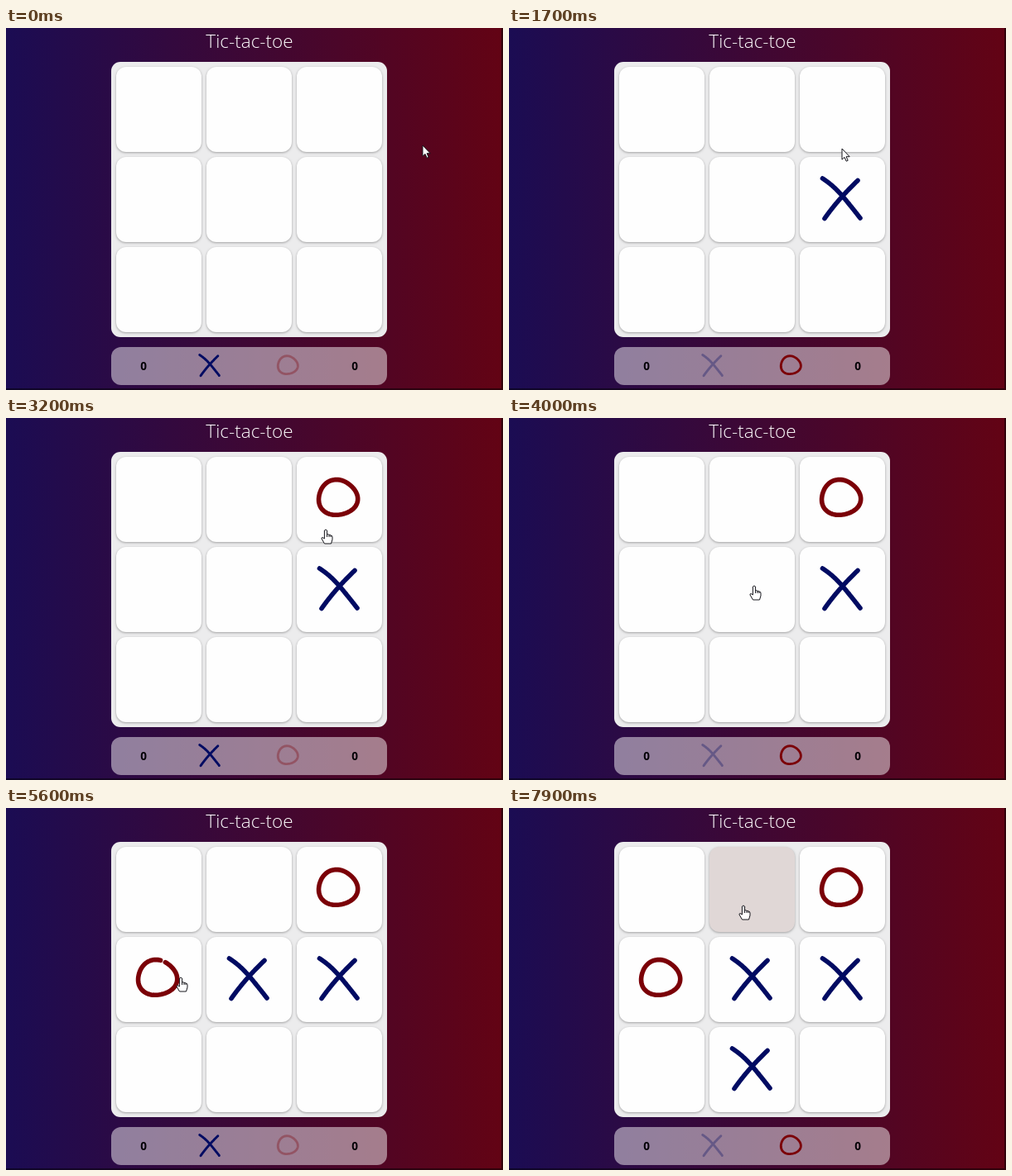
Animation, 600 px wide and 438 px high, one loop 8000 ms. Source, as an HTML page with a canvas:

```html
<!DOCTYPE html>
<html lang="en">
<head>
<meta charset="utf-8">
<title>Tic-tac-toe</title>
<style>
  html, body { margin: 0; width: 100%; height: 100%; overflow: hidden; background: #2b0840; }
  canvas { display: block; }
</style>
</head>
<body>
<canvas id="stage" width="600" height="438"></canvas>
<script>
const ctx = document.getElementById("stage").getContext("2d");
const LOOP = 8000, STEP = 100, DRAW_TIME = 600;
const CELL = { x: 133, y: 47, size: 103, pitch: 109 };
const INK = { X: "#000b62", O: "#7b0007" };
const HOVER = { X: "#d8d9e2", O: "#e0d7d6" };

const MOVES = [
  { at: 700, mark: "X", col: 2, row: 1 },
  { at: 2500, mark: "O", col: 2, row: 0 },
  { at: 4000, mark: "X", col: 1, row: 1 },
  { at: 5100, mark: "O", col: 0, row: 1 },
  { at: 7000, mark: "X", col: 1, row: 2 }
];

// Places where the pointer pauses.
const STOPS = [
  { x: 503, y: 142, arrive: 0, leave: 100 },
  { x: 405, y: 199, arrive: 700, leave: 1400 },
  { x: 402, y: 146, arrive: 1700, leave: 1700 },
  { x: 386, y: 135, arrive: 2300, leave: 3200 },
  { x: 296, y: 203, arrive: 3900, leave: 4600 },
  { x: 211, y: 205, arrive: 5050, leave: 5900 },
  { x: 296, y: 293, arrive: 6900, leave: 7400 },
  { x: 283, y: 118, arrive: 7900, leave: LOOP }
];

const ARROW = new Path2D("M0 0V13.2L3 10.4L5.2 15.2L7.2 14.3L5.1 9.7H9.2Z");
const HAND = new Path2D("M-1.6 1Q0 -1 1.6 1V6Q3 5 4 6.5Q6 6 6 7Q8 7 8 9V12L6.5 17H-1.5L-5 11Q-5 8 -1.6 11Z");
const KNUCKLES = new Path2D("M1.6 6V9M4 6.5V9M6 7V9");

const clamp = v => Math.max(0, Math.min(1, v));
const easeOut = p => 1 - Math.pow(1 - p, 1.5);
const smoothstep = u => u * u * (3 - 2 * u);

function bezier(a, b, c, d) {
  const axis = (u, j) => {
    const v = 1 - u;
    return v * v * v * a[j] + 3 * v * v * u * b[j] + 3 * v * u * u * c[j] + u * u * u * d[j];
  };
  return u => [axis(u, 0), axis(u, 1)];
}

// A slightly three-cornered ring, drawn anticlockwise from the top.
function ring(u) {
  const angle = -1.4 - u * 6.45;
  const r = 1 + 0.04 * Math.cos(3 * (angle - Math.PI * 0.75));
  return [-2 + 23.5 * r * Math.cos(angle), -2 + 21.3 * r * Math.sin(angle)];
}

// Strokes are curves around the centre of a cell.
const STROKES = {
  X: [
    bezier([-24, -25.5], [-8, -15], [0, -5], [21.5, 22.5]),
    bezier([18.5, -23], [6, -11], [-9, 5], [-21.5, 23])
  ],
  O: [ring]
};

function box(x, y, w, h, r, fill) {
  ctx.fillStyle = fill;
  ctx.beginPath();
  ctx.roundRect(x, y, w, h, r);
  ctx.fill();
}

function drawMark(mark, x, y, scale, progress, alpha) {
  const strokes = STROKES[mark], segments = 80;
  ctx.save();
  ctx.translate(x, y);
  ctx.scale(scale, scale);
  ctx.globalAlpha = alpha;
  ctx.strokeStyle = INK[mark];
  ctx.lineWidth = 5.6;
  ctx.lineCap = ctx.lineJoin = "round";
  ctx.beginPath();
  strokes.forEach((curve, i) => {
    const part = clamp(progress * strokes.length - i);
    if (!part) return;
    ctx.moveTo(...curve(0));
    for (let k = 1; k <= segments; k++) ctx.lineTo(...curve(part * k / segments));
  });
  ctx.stroke();
  ctx.restore();
}

function pointerAt(t) {
  const next = STOPS.findIndex(stop => t < stop.leave);
  const to = STOPS[next], from = STOPS[next - 1] || to;
  if (t >= to.arrive) return to;
  const u = smoothstep((t - from.leave) / (to.arrive - from.leave));
  return { x: from.x + (to.x - from.x) * u, y: from.y + (to.y - from.y) * u };
}

function cellUnder({ x, y }) {
  const locate = offset => {
    const i = Math.floor(offset / CELL.pitch), inner = offset - i * CELL.pitch;
    return i >= 0 && i < 3 && inner >= 5 && inner <= CELL.size - 5 ? i : -1;
  };
  const col = locate(x - CELL.x), row = locate(y - CELL.y);
  return col >= 0 && row >= 0 ? { col, row } : null;
}

function drawBackground() {
  const gradient = ctx.createLinearGradient(0, 0, 600, 0);
  gradient.addColorStop(0, "#1b0c53");
  gradient.addColorStop(1, "#630314");
  ctx.fillStyle = gradient;
  ctx.fillRect(0, 0, 600, 438);
  ctx.fillStyle = "rgba(0,0,0,.5)";
  ctx.fillRect(598, 0, 2, 438);
  ctx.fillRect(0, 436, 598, 2);
}

function drawText(text, x, y, font, fill) {
  ctx.font = font;
  ctx.fillStyle = fill;
  ctx.textAlign = "center";
  ctx.fillText(text, x, y);
}

function drawBoard(moves, hover, turn, t) {
  box(127, 41, 333, 333, 11, "#ececed");
  for (let i = 0; i < 9; i++) {
    const col = i % 3, row = Math.floor(i / 3);
    const x = CELL.x + col * CELL.pitch, y = CELL.y + row * CELL.pitch;
    const sameCell = c => c.col === col && c.row === row;
    const move = moves.find(sameCell);
    const lit = !move && hover && sameCell(hover);
    ctx.save();
    ctx.shadowColor = "rgba(0,0,0,.32)";
    ctx.shadowBlur = 3;
    ctx.shadowOffsetY = 1;
    box(x, y, CELL.size, CELL.size, 12, lit ? HOVER[turn] : "#fefefe");
    ctx.restore();
    if (move) {
      const progress = easeOut(clamp((t - move.at) / DRAW_TIME));
      drawMark(move.mark, x + 51.5, y + 51.5, 1, progress, 1);
    }
  }
}

function drawScore(turn) {
  box(127, 386, 333, 46, 12, "rgba(255,255,255,.48)");
  const alpha = mark => mark === turn ? 1 : 0.33;
  drawMark("X", 246.2, 408.8, 0.52, 1, alpha("X"));
  drawMark("O", 341, 409, 0.51, 1, alpha("O"));
  for (const x of [166, 421]) drawText("0", x, 414, 'bold 13.5px "Open Sans", sans-serif', "#050308");
}

function drawPointer({ x, y }, overCell) {
  const shape = overCell ? HAND : ARROW;
  ctx.save();
  ctx.translate(x, y);
  ctx.fillStyle = "#fff";
  ctx.strokeStyle = "#16161c";
  ctx.lineWidth = 1;
  ctx.lineJoin = "round";
  ctx.fill(shape);
  ctx.stroke(shape);
  if (overCell) ctx.stroke(KNUCKLES);
  ctx.restore();
}

function render(t) {
  const moves = MOVES.filter(move => move.at <= t);
  const turn = moves.length % 2 ? "O" : "X";
  const pointer = pointerAt(t), hover = cellUnder(pointer);
  drawBackground();
  drawText("Tic-tac-toe", 294, 24, '300 22.5px "Open Sans", sans-serif', "#fff");
  drawBoard(moves, hover, turn, t);
  drawScore(turn);
  drawPointer(pointer, hover);
}

const start = performance.now();
function tick() {
  const t = (performance.now() - start) % LOOP;
  render(Math.floor(t / STEP) * STEP);
  requestAnimationFrame(tick);
}
tick();
</script>
</body>
</html>
```
